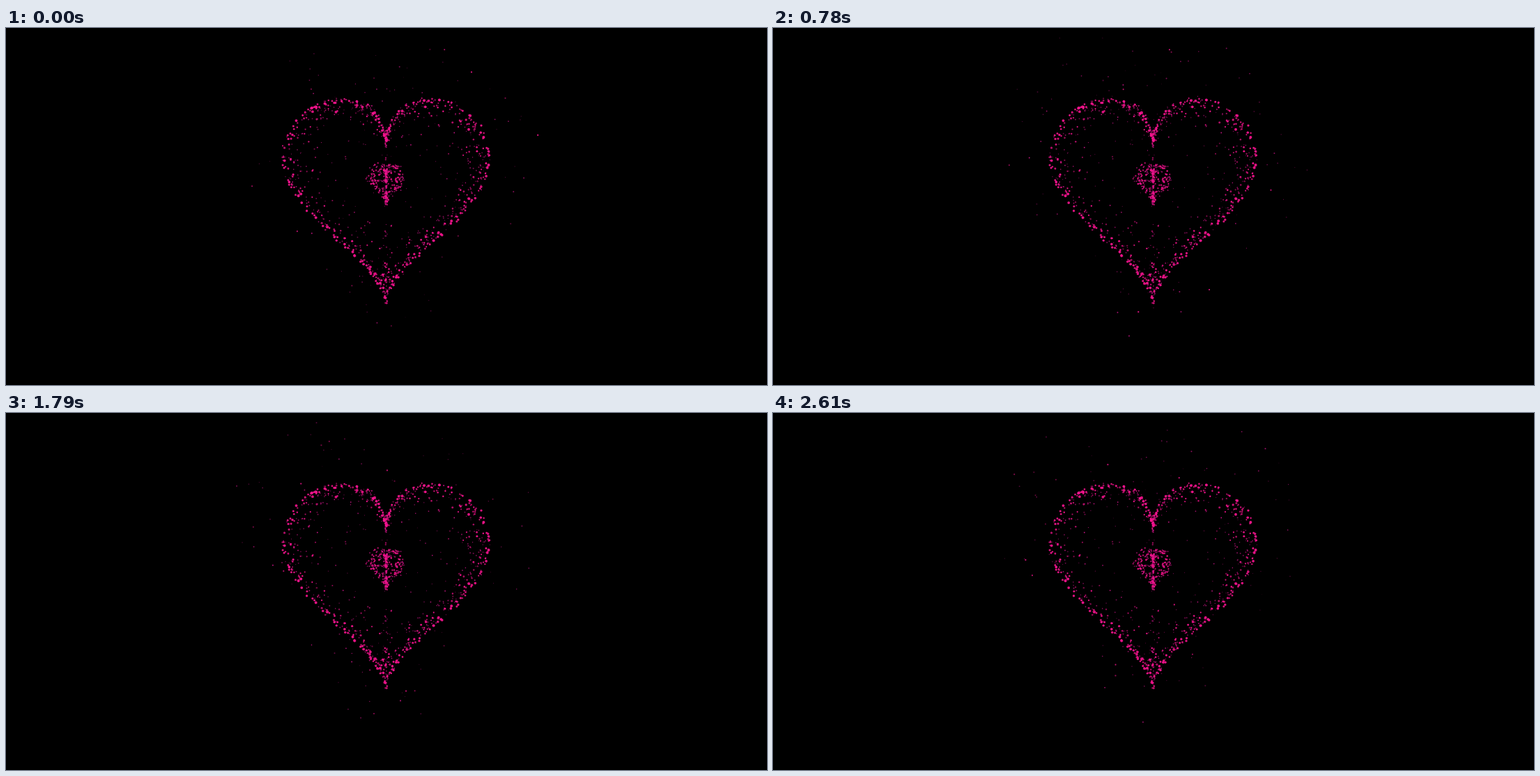
An HTML page with a canvas that plays this animation: 1092 px wide and 513 px high, repeating every 2660 ms.

```html
<!DOCTYPE html>
<html lang="en">
<head>
<meta charset="utf-8">
<title>Beating heart</title>
<style>
html, body { margin: 0; height: 100%; overflow: hidden; background: #000; }
canvas { display: block; width: 1092px; height: 513px; }
</style>
</head>
<body>
<canvas id="stage"></canvas>
<script>
const W = 1092, H = 513, LOOP = 2660, TICKS = 58, STEP = 39.9;
const TICK = LOOP / TICKS;
const CX = 545.5, CY = 202, MID = 219;

const canvas = document.getElementById('stage');
const ctx = canvas.getContext('2d');
const dpr = window.devicePixelRatio || 1;
canvas.width = W * dpr;
canvas.height = H * dpr;
ctx.scale(dpr, dpr);

function rng(seed) {
  let a = seed * 7919 + 17;
  return () => {
    a = (a + 0x6D2B79F5) | 0;
    let t = Math.imul(a ^ (a >>> 15), 1 | a);
    t = (t + Math.imul(t ^ (t >>> 7), 61 | t)) ^ t;
    return ((t ^ (t >>> 14)) >>> 0) / 4294967296;
  };
}
const between = (rand, a, b) => a + (b - a) * rand();

// Heart curve of the contracted pose
function heart(t) {
  const c = k => Math.cos(k * t);
  return [CX + 149 * Math.sin(t) ** 3,
          221.6 - 136.8 * c(1) + 9.15 * (5 * c(2) + 2 * c(3) + c(4))];
}

const rand = rng(5);
const anyAngle = () => between(rand, 0, 2 * Math.PI);

// Angle chosen so that dots lie evenly along the curve
function evenAngle() {
  for (;;) {
    const t = anyAngle(), [x, y] = heart(t), [u, v] = heart(t + 0.01);
    if (Math.hypot(u - x, v - y) > rand() * 2.6) return t;
  }
}

// Dots on the heart curve, pulled at random towards the middle
const dots = [];
function scatter({ count, angle = anyAngle, pull, size, alpha, sx = 1, sy = 1 }) {
  const shrink = () => Math.max(0, 1 + pull * Math.log(1 - rand()));
  for (let i = 0; i < count; i++) {
    const [x, y] = heart(angle());
    dots.push({
      x: CX + (x - CX) * shrink() * sx + between(rand, -1.5, 1.5),
      y: MID + (y - MID) * shrink() * sy + between(rand, -1.5, 1.5),
      r: between(rand, ...size),
      alpha: between(rand, ...alpha)
    });
  }
}

scatter({ count: 330, pull: 0.19, size: [0.5, 1.2], alpha: [0.35, 0.95] });
scatter({ count: 260, angle: evenAngle, pull: 0.11, size: [0.5, 1.3], alpha: [0.4, 0.95] });
scatter({ count: 260, pull: 0.06, size: [0.8, 1.6], alpha: [0.6, 0.95] });
scatter({ count: 150, angle: evenAngle, pull: 0.03, size: [1.3, 2.1], alpha: [0.85, 0.95] });
scatter({ count: 330, pull: 0.35, size: [0.7, 1.35], alpha: [0.6, 0.95], sx: 0.195, sy: 0.205 });

function dot(x, y, r, alpha) {
  ctx.fillStyle = r > 1.05 ? '#f8148f' : '#c71585';
  ctx.globalAlpha = alpha;
  ctx.beginPath();
  ctx.arc(x, y, r, 0, 2 * Math.PI);
  ctx.fill();
}

// Loose sparks around the heart, new at every step
function halo(step) {
  const r = rng(step + 100);
  for (let i = 0; i < 110; i++) {
    const [x, y] = heart(between(r, 0, 2 * Math.PI));
    dot(CX + (x - CX) * 1.1 + between(r, -60, 60),
        200 + (y - MID) * 1.09 + between(r, -60, 60),
        between(r, 0.4, 1.15), between(r, 0.25, 0.9));
  }
}

function draw(time) {
  const tick = Math.floor((time % LOOP + 5) / TICK) % TICKS;
  const step = Math.floor(tick * TICK / STEP + 0.465);
  // Five steps make one beat
  const grow = (Math.sin(0.4 * Math.PI * (step - 1)) + 0.951) * 0.126;
  ctx.globalAlpha = 1;
  ctx.fillStyle = '#000';
  ctx.fillRect(0, 0, W, H);
  for (const d of dots) {
    dot(d.x + (d.x - CX) * grow, d.y + (d.y - CY) * grow * 0.85, d.r, d.alpha);
  }
  halo(step);
}

const start = performance.now();
function loop() {
  draw(performance.now() - start);
  requestAnimationFrame(loop);
}
loop();
</script>
</body>
</html>
```
